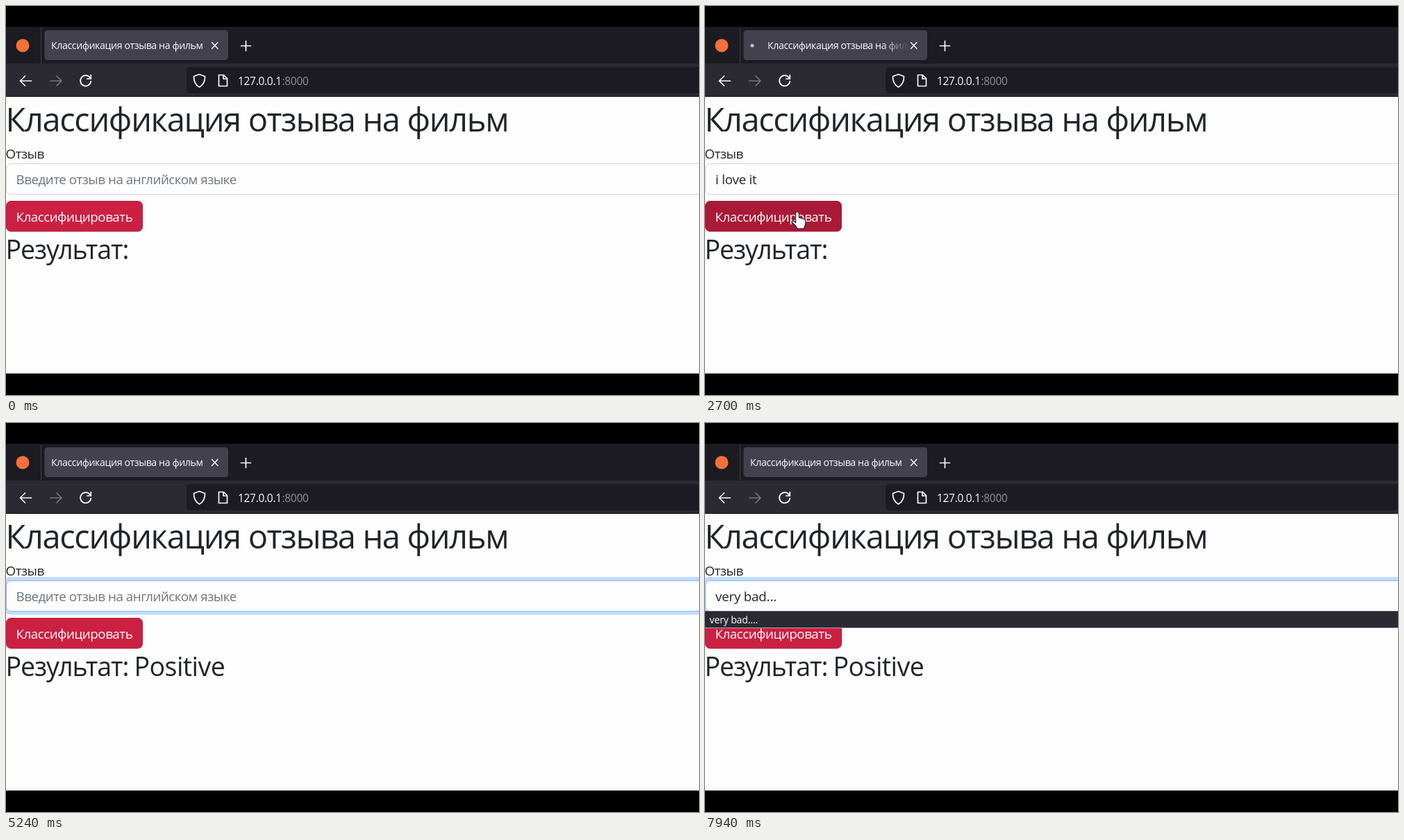
Write an HTML page that moves like this. It is 998 px wide and 561 px high and loops after 8 s.

```html
<!DOCTYPE html>
<html lang="ru">
<head>
<meta charset="utf-8">
<title>Классификация отзыва на фильм</title>
<style>
  html, body { margin: 0; width: 100%; height: 100%; overflow: hidden; background: #000; }
  svg { display: block; width: 998px; height: 561px; font-family: "Open Sans", "Noto Sans", sans-serif; }
  text { white-space: pre; fill: #212529; letter-spacing: -.028em; }
  .latin { letter-spacing: -.015em; }
  .body { font-size: 18.8px; letter-spacing: -.025em; }
  .body.latin { letter-spacing: -.012em; }
  .small { font-size: 14.2px; }
  .url { font-size: 15.5px; letter-spacing: -.02em; }
  .light { fill: #fbfbfe; }
  .icon { fill: none; stroke: #fbfbfe; stroke-width: 1.7; stroke-linecap: round; stroke-linejoin: round; }
  .pointer { fill: #fff; stroke: #222; stroke-width: 1.1; stroke-linejoin: round; }
</style>
</head>
<body>
<svg viewBox="0 0 998 561">
  <defs>
    <linearGradient id="fade" gradientUnits="userSpaceOnUse" x1="256" x2="293" y1="0" y2="0">
      <stop stop-color="#fff"/><stop offset="1" stop-color="#000"/>
    </linearGradient>
    <mask id="titleMask" maskUnits="userSpaceOnUse" x="56" y="35" width="237" height="43">
      <rect x="56" y="35" width="237" height="43" fill="url(#fade)"/>
    </mask>
  </defs>

  <rect width="998" height="561"/>
  <rect y="30" width="998" height="53" fill="#1c1b22"/>
  <rect y="83" width="998" height="48" fill="#2b2a33"/>
  <rect y="130" width="998" height="1" fill="#111016"/>
  <rect x="50" y="31" width="1" height="52" fill="#3d3c47"/>
  <rect x="55.5" y="35" width="264.5" height="43" rx="4.5" fill="#42414d"/>
  <circle cx="24" cy="57" r="9.5" fill="#f5703a"/>
  <text id="tabTitle" class="small light" x="65" y="62">Классификация отзыва на фильм</text>
  <circle id="throbber" cy="57" r="2.6" fill="#bdbcc8"/>
  <rect x="260" y="88" width="760" height="38" rx="5" fill="#1c1b22"/>
  <g class="icon">
    <path d="M296.500 52.500l8.500 9m0-9l-8.500 9" stroke-width="1.4"/>
    <path d="M338.500 57.500h14m-7-7v14"/>
    <path d="M36.500 108H21m6.500-7l-7 7 7 7"/>
    <path d="M64 108h15.500m-6.500-7l7 7-7 7" stroke="#77767f"/>
    <path d="M121 103.500a7.600 7.600 0 1 0 1.300 5M122.300 99.500v5.500h-5.500"/>
    <path d="M278.500 98.500l8 3q.3 11-8 15.500q-8.300-4.500-8-15.500z"/>
    <path d="M306.500 99.500h7l5 5v11h-12zM313 99.500v5.500h5.500"/>
  </g>
  <text class="url light" x="334" y="113.500">127.0.0.1</text>
  <text class="url" x="397.500" y="113.500" style="fill:#8f8f98">:8000</text>

  <rect y="131" width="998" height="399" fill="#fdfdfd"/>
  <text x="-.5" y="181" font-size="47">Классификация отзыва на фильм</text>
  <text class="body" x="-.5" y="220">Отзыв</text>
  <rect id="ring" x="-4.500" y="222" width="1020" height="54.500" rx="11" fill="#c2dbfe"/>
  <rect id="field" x=".5" y="227.500" width="1020" height="44" rx="7" fill="#fdfdfd"/>
  <rect id="selection" x="15" y="238" height="25" fill="#0078d7"/>
  <text id="hint" class="body" x="14.500" y="257" style="fill:#6c757d">Введите отзыв на английском языке</text>
  <text id="entry" class="body latin" x="15" y="257"></text>
  <rect id="caret" y="238" width="1.200" height="25" fill="#212529"/>
  <rect id="button" x=".5" y="281.500" width="196" height="43.500" rx="6.500" stroke="#b01c3b"/>
  <text class="body light" x="14.500" y="311">Классифицировать</text>
  <text x="-.5" y="365" font-size="37.500">Результат:</text>
  <text id="result" class="latin" x="184.500" y="365" font-size="37.500">Positive</text>

  <g id="popup">
    <rect id="popupBox" y="271" width="998" fill="#2b2a33"/>
    <path d="M0 271.500H998" stroke="#55545f"/>
    <path id="popupEdge" stroke="#aaa9b2"/>
    <text id="option1" class="small latin light" x="6.500" y="289"></text>
    <text id="option2" class="small latin light" x="6.500" y="313"></text>
  </g>

  <g id="cursor">
    <path id="arrow" class="pointer" d="M0 0v18l4-4 3 7 3-1.300-3-6.700h6z"/>
    <path id="beam" d="M-3-10h6M0-10v20M-3 10h6" fill="none" stroke="#222" stroke-width="1.300"/>
    <path id="hand" class="pointer" d="M-2.300 2a2.300 2.300 0 0 1 4.600 0v6.500q5 .3 8.500 2.500q1.500 1.500 1 5q-.8 5-2.500 8h-9q-3-5-7.500-8.500q-1.200-3 1.800-2.500l3.100 2.500z"/>
  </g>
  <rect y="530" width="998" height="31"/>
</svg>
<script>
const LOOP = 8000, BLINK = 530;
const $ = id => document.getElementById(id);

// [time, field content]
const keys = [
  [0, ''], [640, 'i'], [760, 'i '], [960, 'i l'], [1080, 'i lo'], [1180, 'i lov'],
  [1300, 'i love'], [1400, 'i love '], [1560, 'i love i'], [1680, 'i love it'],
  [4660, ''], [5520, 'v'], [5650, 've'], [5780, 'ver'], [5900, 'very'], [6050, 'very '],
  [6200, 'very b'], [6360, 'very ba'], [6500, 'very bad'], [6900, 'very bad/'],
  [7090, 'very bad'], [7210, 'very bad.'], [7300, 'very bad..'], [7380, 'very bad...']
];
// [start, end, x1, y1, x2, y2]
const moves = [
  [40, 300, 200, 536, 150, 252],
  [300, 640, 150, 252, 150, 252],
  [2150, 2360, 150, 252, 133, 297],
  [2360, 3160, 133, 297, 133, 297],
  [3850, 4150, 133, 297, 140, 252],
  [4150, 4660, 140, 252, 140, 252]
];
const focusSpans = [[320, 2400], [4200, LOOP]];
const popups = [[650, 2250, 'i love it', 'i love it)'], [5540, LOOP, 'very bad....', '']];
const loading = [2420, 3160];

const spanAt = (list, t) => list.find(([from, to]) => t >= from && t < to);
const clamp = v => Math.max(0, Math.min(1, v));
const ease = v => v * v * (3 - 2 * v);
const show = (id, on) => $(id).style.display = on ? '' : 'none';
const set = (id, attrs) => Object.entries(attrs).forEach(([k, v]) => $(id).setAttribute(k, v));
const mix = (a, b, k) => `rgb(${a.map((v, i) => Math.round(v + (b[i] - v) * k))})`;

function drawTab(t) {
  const busy = t >= loading[0] && t < loading[1];
  set('tabTitle', { x: busy ? 90 : 65, mask: busy ? 'url(#titleMask)' : 'none' });
  show('throbber', busy);
  const phase = (t - 2700) / 1050 * 2 * Math.PI;
  set('throbber', { cx: 75 - 7 * Math.cos(phase) });
}

function drawField(t) {
  const [keyTime, value] = keys.findLast(([at]) => at <= t);
  const focus = spanAt(focusSpans, t);
  const glow = focus ? clamp((t - focus[0]) / 150) : 0;
  $('ring').style.opacity = glow;
  set('field', { stroke: mix([206, 212, 218], [134, 183, 254], glow) });
  show('hint', !value);
  $('entry').textContent = value;

  const width = value ? $('entry').getComputedTextLength() : 0;
  const selected = t >= 4400 && t < 4660;
  show('selection', selected);
  set('selection', { width });
  $('entry').style.fill = selected ? '#fff' : '';
  const since = focus ? t - Math.max(keyTime, focus[0]) : 0;
  show('caret', focus && !selected && Math.floor(since / BLINK) % 2 === 0);
  set('caret', { x: 15 + width });
}

function drawPopup(t) {
  const popup = spanAt(popups, t);
  show('popup', popup);
  if (!popup) return;
  const [, , first, second] = popup;
  const bottom = second ? 320 : 296;
  set('popupBox', { height: bottom - 271 });
  set('popupEdge', { d: `M0 ${bottom - .5}H998` });
  $('option1').textContent = first;
  $('option2').textContent = second;
}

function drawCursor(t) {
  const move = spanAt(moves, t);
  let overButton = false;
  show('cursor', move);
  if (move) {
    const [from, to, x1, y1, x2, y2] = move;
    const k = ease(clamp((t - from) / (to - from)));
    const x = x1 + (x2 - x1) * k, y = y1 + (y2 - y1) * k;
    const overField = y >= 227 && y < 272;
    overButton = x < 197 && y >= 281 && y < 326;
    set('cursor', { transform: `translate(${x} ${y})` });
    show('beam', overField);
    show('hand', overButton);
    show('arrow', !overField && !overButton);
  }
  set('button', { fill: overButton ? '#a81a36' : '#cc2043' });
}

function draw(t) {
  drawTab(t);
  drawField(t);
  drawPopup(t);
  drawCursor(t);
  show('result', t >= loading[1]);
}

const start = performance.now();
function tick() {
  draw((performance.now() - start) % LOOP);
  requestAnimationFrame(tick);
}
tick();
</script>
</body>
</html>
```
